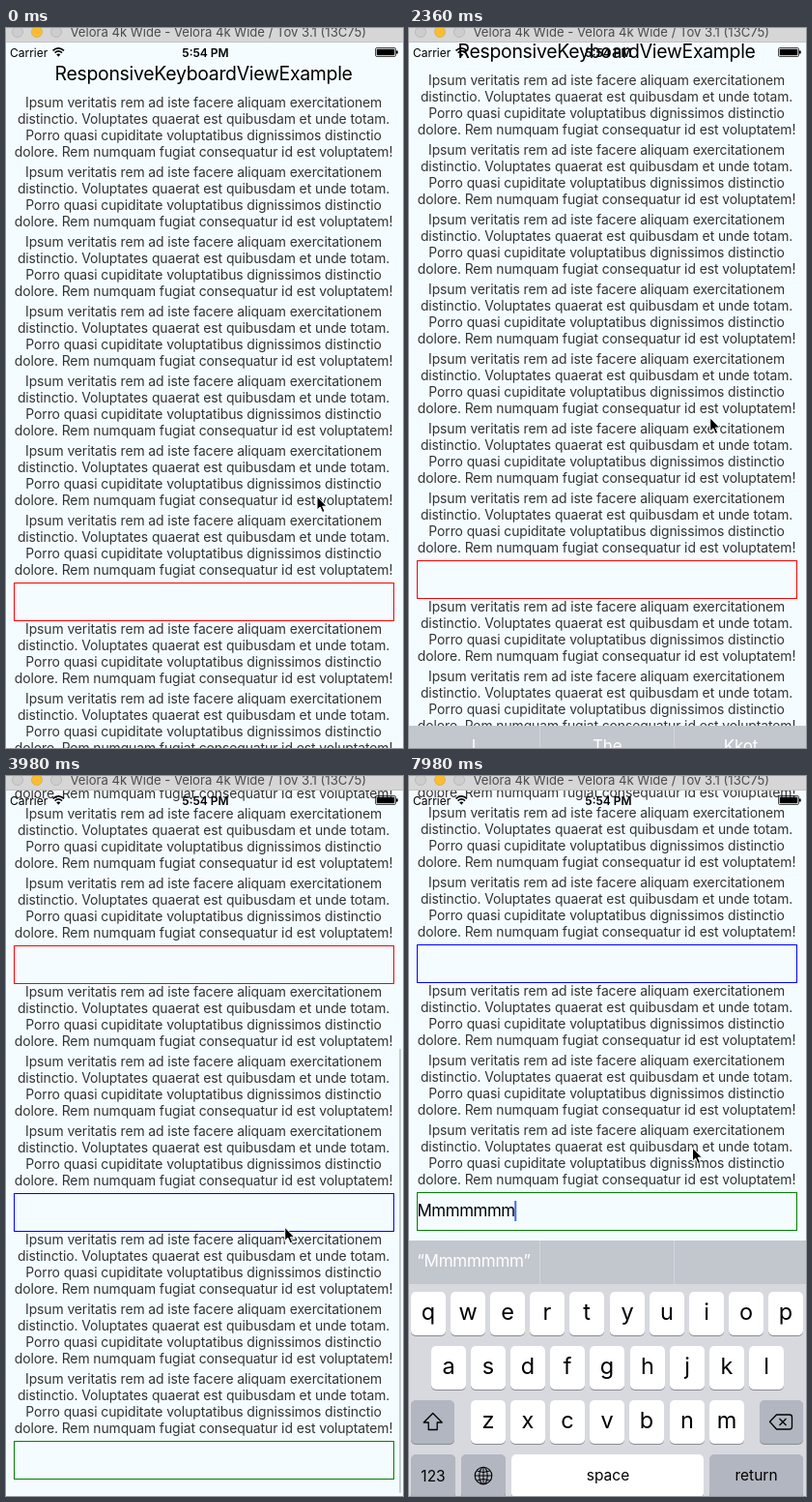
Animation of 411x744 px, one loop 8000 ms. Source, as an HTML page:

```html
<!DOCTYPE html>
<html lang="en">
<head>
<meta charset="utf-8">
<title>Responsive keyboard view</title>
<style>
  html, body { margin: 0; width: 100%; height: 100%; overflow: hidden; background: #f5fcff; }
  svg { display: block; width: 100%; height: 100%; font-family: Inter, Roboto, sans-serif; font-optical-sizing: none; }
  .body { font-size: 13.9px; letter-spacing: -.08px; fill: #333; }
  .head { font-size: 19.4px; letter-spacing: -.27px; }
  .input { font-size: 16.9px; letter-spacing: -.4px; }
  .hint { font-size: 17px; letter-spacing: -.2px; fill: #fff; }
  .label { font-size: 15.5px; }
  .status { font-size: 12px; }
</style>
</head>
<body>
<svg id="stage" viewBox="0 0 411 744"></svg>
<script>
const NS = 'http://www.w3.org/2000/svg';
const LOOP = 8000, TICK = 147.7;   // the screen refreshes once per tick
const MID = 204.6, DARK = '#b1b6c0';

function add(parent, tag, attrs = {}, text) {
  const node = document.createElementNS(NS, tag);
  for (const k in attrs) node.setAttribute(k, attrs[k]);
  if (text !== undefined) node.textContent = text;
  parent.appendChild(node);
  return node;
}
const rect = (p, x, y, width, height, fill, more) =>
  add(p, 'rect', { x, y, width, height, fill, ...more });
const label = (p, x, y, text, cls, more) =>
  add(p, 'text', { x, y, class: cls, 'text-anchor': 'middle', ...more }, text);
const line = (p, d, width = 1.3) =>
  add(p, 'path', { d, fill: 'none', stroke: '#000', 'stroke-width': width, 'stroke-linejoin': 'round' });

const stage = document.getElementById('stage');
rect(stage, 0, 0, 411, 744, '#f5fcff');

// Scrolling page
const page = add(stage, 'g');
const LINES = [
  'Ipsum veritatis rem ad iste facere aliquam exercitationem',
  'distinctio. Voluptates quaerat est quibusdam et unde totam.',
  'Porro quasi cupiditate voluptatibus dignissimos distinctio',
  'dolore. Rem numquam fugiat consequatur id est voluptatem!'
];
label(page, MID, 54, 'ResponsiveKeyboardViewExample', 'head');
let y = 69;
for (const [count, stroke] of [[7, '#f00'], [3, '#00f'], [3, '#008000']]) {
  for (let i = 0; i < count; i++, y += 72)
    LINES.forEach((s, j) => label(page, MID, y + 13 + 17 * j, s, 'body'));
  rect(page, 8.5, y + .5, 393, 39, 'none', { stroke });
  y += 40;
}
const fieldTop = y - 40;
const typed = add(page, 'text', { x: 8.5, y: fieldTop + 25, class: 'input' });
const caret = rect(page, 0, fieldTop + 9, 2, 21, '#426bf2');

const thumb = rect(stage, 407, 0, 2, 480, '#989ea1', { rx: 1 });

// Status bar
add(stage, 'text', { x: 4, y: 29.5, class: 'status' }, 'Carrier');
label(stage, 206.5, 29.5, '5:54 PM', 'status', { 'font-weight': 600 });
line(stage, 'M48.5 23.3Q54.3 18.3 60 23.3M50.6 25.6Q54.3 22.3 58 25.6', 1.7);
add(stage, 'path', { d: 'M52.2 27.3Q54.3 25.6 56.4 27.3L54.3 29.8Z' });
rect(stage, 382.5, 20.5, 21, 9, 'none', { rx: 1.5, stroke: '#000', 'stroke-width': .7 });
rect(stage, 383.7, 21.7, 18.6, 6.6, '#000', { rx: .8 });
rect(stage, 404, 23.3, 1.7, 3.4, '#000', { rx: .8 });

// Keyboard
const board = add(stage, 'g');
rect(board, 0, 480, 411, 264, '#d7d9df');
rect(board, 0, 480, 411, 45, '#c2c6cd');
for (const x of [135, 274]) rect(board, x, 480, 1, 45, '#d3d6db');
const hints = [0, 1, 2].map(i => label(board, 67 + 138.2 * i, 507, '', 'hint'));

function key(x, top, width, fill = '#fff') {
  rect(board, x, top + 1, width, 45, '#898c92', { rx: 5 });
  return rect(board, x, top, width, 45, fill, { rx: 5 });
}
const letters = [];
[['QWERTYUIOP', 20], ['ASDFGHJKL', 41], ['ZXCVBNM', 82]].forEach(([row, x0], r) => {
  [...row].forEach((ch, i) => {
    const x = Math.round(x0 + 41.1 * i), top = 533 + 56 * r;
    key(x - 18, top, 36);
    letters.push({ ch, top, node: label(board, x, 0, ch) });
  });
});
const shift = key(2, 645, 45);
const arrow = line(board, 'M24.7 658.5L34.2 668H29.2V675.5H20.2V668H15.2Z');
key(363, 645, 45, DARK);
line(board, 'M373.5 667.3L380.5 660H394Q396.5 660 396.5 662.5V672.5Q396.5 675 394 675H380.5Z');
line(board, 'M383.5 664L390.5 671M390.5 664L383.5 671');
key(2, 701, 46, DARK);
key(54, 701, 46, DARK);
key(106, 701, 199);
key(311, 701, 97, DARK);
label(board, 25, 728.5, '123', 'label');
label(board, 206, 727.5, 'space', 'label');
label(board, 359.5, 727.5, 'return', 'label');
for (const rx of [8.8, 4.2])
  add(board, 'ellipse', { cx: 77, cy: 723, rx, ry: 8.8, fill: 'none', stroke: '#000', 'stroke-width': 1.1 });
line(board, 'M77 714V732M68 723H86M70.3 718Q77 721 83.7 718M70.3 728Q77 725 83.7 728', 1);

// Window bar
rect(stage, 0, 0, 411, 15, '#d6d6d6');
rect(stage, 0, 14, 411, 1, '#c3c3c3');
['#cdcdcd', '#fdbd2f', '#cdcdcd'].forEach((fill, i) =>
  add(stage, 'circle', { cx: 12 + 20 * i, cy: 4, r: 5.6, fill, stroke: '#0002', 'stroke-width': .8 }));
add(stage, 'text', { x: 66.5, y: 9, 'font-size': 13.1, fill: '#4b4b4b' },
  'Velora 4k Wide - Velora 4k Wide / Tov 3.1 (13C75)');

const mouse = add(stage, 'path', { d: 'M0 0V14L3.2 11L5.6 16.5L8 15.4L5.7 10.2H10Z', stroke: '#fff' });

// Motion, timed in ticks
const ramp = (n, from, to) => Math.min(1, Math.max(0, (n - from) / (to - from)));
const easeIn = (n, from, to, power) => ramp(n, from, to) ** power;
const easeOut = (n, from, to) => 1 - (1 - ramp(n, from, to)) ** 2.23;

const keyboardShown = n => easeOut(n, 6, 9) - easeOut(n, 14, 17) + easeOut(n, 33, 36);
const scrollTop = n =>
  271 * (easeIn(n, 6, 9, 1.53) - easeOut(n, 14, 17)) +   // first field, then dismissed
  398 * easeIn(n, 19, 24, 1.3) +                         // swipe to the end
  257 * easeIn(n, 33, 36, 1.53);                         // last field
const thumbShown = n => ramp(n, 19, 20) - ramp(n, 26, 28);
const typedCount = n => Math.min(7, Math.max(0, Math.floor((n - 44) / 1.3) + 1));

// Pointer stops: tick, x, y
const STOPS = [[0, 322, 484], [4, 323, 580], [9, 323, 580], [14, 317, 425], [19, 302, 362],
  [20, 301, 313], [22, 300, 190], [24, 298, 397], [34, 255, 718], [40, 317, 550],
  [43, 342, 668], [52, 342, 668], [54, 293.5, 384]];

function pointer(n) {
  const i = Math.max(1, STOPS.findIndex(s => s[0] >= n));
  const [a, ax, ay] = STOPS[i - 1], [b, bx, by] = STOPS[i];
  const p = ramp(n, a, b), e = p * p * (3 - 2 * p);
  return [ax + (bx - ax) * e, ay + (by - ay) * e];
}
const place = (node, x, y) => node.setAttribute('transform', `translate(${x} ${y})`);

function draw(time) {
  const n = Math.floor((time % LOOP + 8) / TICK);
  const scroll = Math.round(scrollTop(n));
  place(page, 0, -scroll);
  place(board, 0, Math.round(264 * (1 - keyboardShown(n))));
  place(mouse, ...pointer(n));

  const top = 18 + .663 * scroll;
  thumb.setAttribute('y', top);
  thumb.setAttribute('height', Math.max(8, Math.min(480, 741 - top)));
  thumb.setAttribute('opacity', thumbShown(n));

  const count = typedCount(n);
  const word = count ? 'M' + 'm'.repeat(count - 1) : '';
  typed.textContent = word;
  caret.setAttribute('x', 8 + (count ? typed.getComputedTextLength() : 0));
  caret.setAttribute('opacity', count ? 1 : 0);
  const words = count ? [`“${word}”`, '', ''] : ['I', 'The', 'Kkot'];
  hints.forEach((h, i) => { h.textContent = words[i]; });

  for (const { ch, node, top } of letters) {
    node.textContent = count ? ch.toLowerCase() : ch;
    node.setAttribute('font-size', count ? 23.5 : 22);
    node.setAttribute('y', top + (count ? 29 : 30));
  }
  shift.setAttribute('fill', count ? DARK : '#fff');
  arrow.setAttribute('fill', count ? 'none' : '#000');
}

const start = performance.now();
function loop() {
  draw(performance.now() - start);
  requestAnimationFrame(loop);
}
loop();
</script>
</body>
</html>
```
